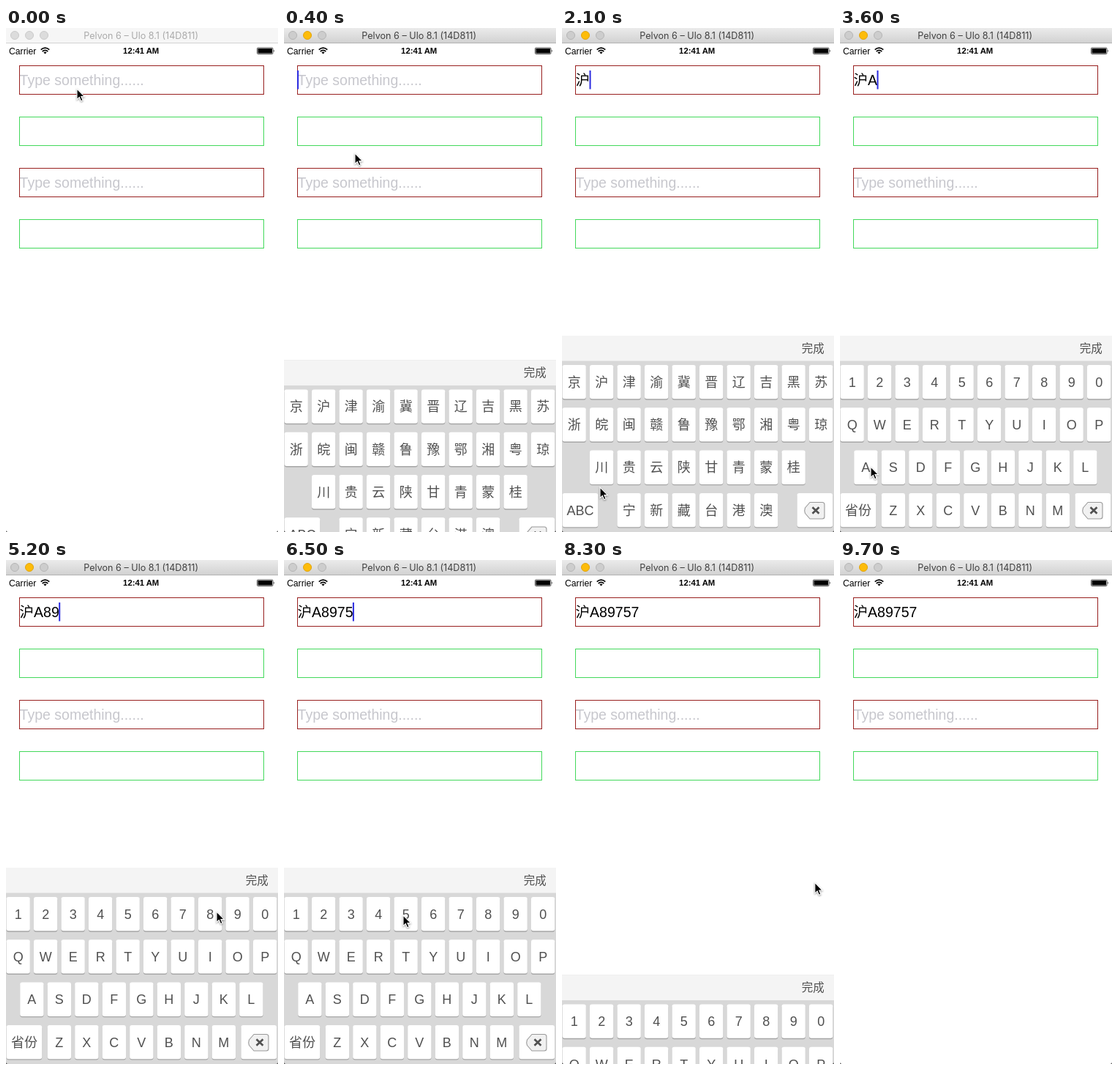
An HTML page for the animation above (9.8 s loop, 372 by 688 pixels).

```html
<!DOCTYPE html>
<html lang="zh-CN">
<head>
<meta charset="utf-8">
<style>
html, body { margin: 0; width: 100%; height: 100%; overflow: hidden; background: #fff; }
svg { display: block; width: 372px; height: 688px; }
text { font-family: "Liberation Sans", "Noto Sans CJK SC", "Noto Sans CJK", sans-serif; }
#title { font: 12.6px Inter, sans-serif; }
.mid { text-anchor: middle; }
.field { font-size: 19.5px; }
.key { font-size: 18px; fill: #505050; }
</style>
</head>
<body>
<svg id="stage" viewBox="0 0 372 688">
  <defs>
    <linearGradient id="bar" x2="0" y2="1">
      <stop stop-color="#ebebeb"/><stop offset="1" stop-color="#d2d2d2"/>
    </linearGradient>
  </defs>
  <rect width="372" height="688" fill="#fff"/>
  <rect id="chrome" width="372" height="20"/>
  <rect id="edge" y="20" width="372" height="1"/>
  <g id="lights" stroke-width="1"></g>
  <text id="title" class="mid" x="184.7" y="15">Pelvon 6 – Ulo 8.1 (14D811)</text>

  <text x="4" y="35.5" font-size="12.2">Carrier</text>
  <g fill="none" stroke="#000" stroke-width="1.7">
    <path d="M47.7 29.6Q53.5 24.8 59.3 29.6M49.7 32Q53.5 28.8 57.3 32"/>
    <path d="M51.4 33.2Q53.5 31.6 55.6 33.2L53.5 35.6Z" fill="#000" stroke="none"/>
  </g>
  <text class="mid" x="184.7" y="35.4" font-size="11.3" font-weight="bold">12:41 AM</text>
  <rect x="343.5" y="27" width="21.5" height="8.5" rx="1.2" fill="none" stroke="#000" stroke-width=".7"/>
  <rect x="344.5" y="28" width="19.5" height="6.5"/>
  <path d="M366 29.5Q367.6 31.2 366 33Z"/>

  <g id="boxes" fill="none"></g>
  <text id="hint" class="field" x="18.6" y="78" fill="#c7c7cd">Type something......</text>
  <text class="field" x="18.6" y="218" fill="#c7c7cd">Type something......</text>
  <text id="typed" class="field" x="18.6" y="78"></text>
  <rect id="caret" y="58" width="2" height="25.5" fill="#2b2be0"/>

  <g id="keyboard">
    <rect y="420" width="372" height="268" fill="#d8d8d8"/>
    <rect y="420" width="372" height="34.5" fill="#f4f4f4"/>
    <text class="mid" x="343.3" y="442.5" font-size="15.5" fill="#505050">完成</text>
    <g id="provinces"></g>
    <g id="letters"></g>
    <g id="delete"></g>
  </g>
  <path d="M0 685Q0 688 3 688H0ZM372 685Q372 688 369 688H372Z" fill="#444"/>
  <path id="pointer" d="M0 0V14.6L3.3 11.5L5.6 16.8L8.1 15.7L5.9 10.6H10.4Z"
    stroke="#fff" stroke-width="1.1" style="filter:drop-shadow(0 1px 1px #0006)"/>
</svg>
<script>
const LOOP = 9800, FOCUS = 200, SWAP = 2600, DONE = 8200;
const $ = id => document.getElementById(id);

function add(parent, tag, attrs, text = '') {
  const node = document.createElementNS('http://www.w3.org/2000/svg', tag);
  for (const k in attrs) node.setAttribute(k, attrs[k]);
  node.textContent = text;
  return parent.appendChild(node);
}

function addKey(parent, x, row, w, label) {
  const y = 460 + row * 58.3;
  add(parent, 'rect', { x, y: y + 1.2, width: w, height: 46.5, rx: 3, fill: '#a6a6a6' });
  add(parent, 'rect', { x, y, width: w, height: 46.3, rx: 3, fill: '#fff' });
  add(parent, 'text', { class: 'key mid', x: x + w / 2, y: y + 29.8 }, label);
}

// Each row: first key's x, then its labels.
function addKeys(parent, rows, swapLabel) {
  rows.forEach(([x, labels], row) =>
    [...labels].forEach((c, i) => addKey(parent, x + i * 37.5, row, 32.3, c)));
  addKey(parent, 0.6, 3, 48.6, swapLabel);
}

addKeys($('provinces'), [[0.5, '京沪津渝冀晋辽吉黑苏'], [0.5, '浙皖闽赣鲁豫鄂湘粤琼'],
  [38, '川贵云陕甘青蒙桂'], [75.5, '宁新藏台港澳']], 'ABC');
addKeys($('letters'), [[0.5, '1234567890'], [0.5, 'QWERTYUIOP'],
  [19.2, 'ASDFGHJKL'], [56.7, 'ZXCVBNM']], '省份');
addKey($('delete'), 321.5, 3, 48.6, '');
add($('delete'), 'path', { d: 'M339 647.5H356Q359 647.5 359 650.5V667Q359 670 356 670H339L332.5 662.5Q331 658.8 332.5 655Z',
  fill: '#f1f1f1', stroke: '#999', 'stroke-width': 1.1, 'stroke-linejoin': 'round' });
add($('delete'), 'path', { d: 'M342.5 654.2L351.5 662.8M351.5 654.2L342.5 662.8', stroke: '#505050', 'stroke-width': 2.6 });

for (let i = 0; i < 4; i++)
  add($('boxes'), 'rect', { x: 18.5, y: 51.5 + 70 * i, width: 334, height: 39, stroke: i % 2 ? '#43d95b' : '#98201f' });
const lights = [12, 32, 52].map(cx => add($('lights'), 'circle', { cx, cy: 10, r: 5.5 }));

const typing = [[1700, '沪'], [3400, 'A'], [4300, '8'], [4900, '9'], [5700, '7'], [6450, '5'], [7200, '7']];

const path = [
  [0, 97, 83], [200, 97, 83], [700, 97, 331], [1300, 58, 488], [1800, 58, 488],
  [2100, 52, 627], [2400, 28, 655], [2700, 28, 655], [3000, 35, 622], [3300, 42, 599],
  [3600, 42, 599], [4000, 288, 480], [4500, 288, 480], [4700, 313, 482], [5050, 313, 482],
  [5200, 288, 480], [5500, 238, 482], [5900, 238, 482], [6300, 163, 485], [6600, 163, 485],
  [6900, 238, 485], [7250, 238, 485], [7700, 318, 456], [8000, 345, 438], [8250, 345, 438],
  [8800, 380, 540], [LOOP, 380, 540]
];

function pointerAt(t) {
  const i = path.findIndex(p => p[0] > t);
  const [t0, x0, y0] = path[i - 1], [t1, x1, y1] = path[i];
  const u = (t - t0) / (t1 - t0), e = u * u * (3 - 2 * u);
  return [x0 + (x1 - x0) * e, y0 + (y1 - y0) * e];
}

// Critically damped spring, 1 at the start and settling at 0.
const spring = ms => ms < 0 ? 1 : (1 + 0.018 * ms) * Math.exp(-0.018 * ms);

function blink(ms) {
  const p = ms % 1000;
  if (p < 450) return 1;
  if (p < 700) return 1 - (p - 450) / 250;
  return p < 850 ? 0 : (p - 850) / 150;
}

function setWindow(active) {
  $('chrome').setAttribute('fill', active ? 'url(#bar)' : '#f6f6f6');
  $('edge').setAttribute('fill', active ? '#b3b3b3' : '#d3d3d3');
  $('title').setAttribute('fill', active ? '#404040' : '#aaa');
  lights.forEach((c, i) => {
    const on = active && i === 1;
    c.setAttribute('fill', on ? '#fdbc0a' : active ? '#cdcdcd' : '#dcdcdc');
    c.setAttribute('stroke', on ? '#e0a410' : active ? '#b5b5b5' : '#cacaca');
  });
}

function draw(t) {
  setWindow(t >= 100);
  const done = typing.filter(k => k[0] <= t);
  $('typed').textContent = done.map(k => k[1]).join('');
  $('hint').style.display = done.length ? 'none' : '';

  const since = done.length ? done[done.length - 1][0] : FOCUS;
  const width = done.length ? $('typed').getComputedTextLength() : 0;
  $('caret').setAttribute('x', 18 + width);
  $('caret').setAttribute('opacity', t >= FOCUS && t < DONE ? blink(t - since) : 0);

  const drop = t < DONE ? spring(t - FOCUS) : 1 - spring(t - DONE);
  $('keyboard').setAttribute('transform', `translate(0 ${270 * drop})`);
  $('provinces').style.display = t < SWAP ? '' : 'none';
  $('letters').style.display = t < SWAP ? 'none' : '';

  $('pointer').setAttribute('transform', `translate(${pointerAt(t).join(' ')})`);
}

const start = performance.now();
function tick() {
  draw((performance.now() - start) % LOOP);
  requestAnimationFrame(tick);
}
tick();
</script>
</body>
</html>
```
